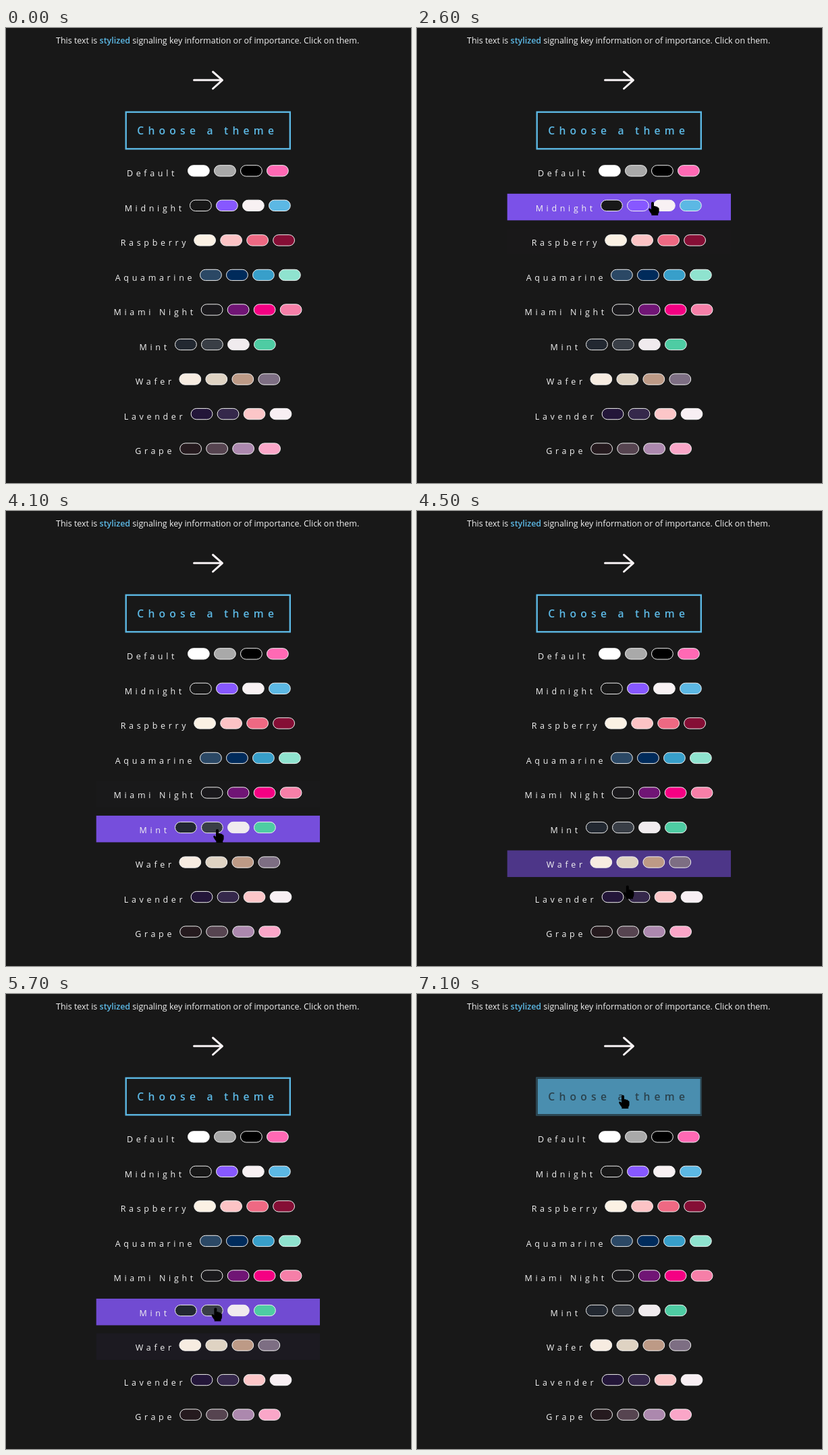
Animation of 600x675 px, one loop 7.2 s. Source, as an HTML page:

```html
<!DOCTYPE html>
<html lang="en">
<head>
<meta charset="utf-8">
<title>Theme picker</title>
<style>
  html, body { margin: 0; width: 100%; height: 100%; overflow: hidden; background: #181818; }
  svg { display: block; width: 600px; height: 675px; }
  text { font-family: "Open Sans", sans-serif; font-size: 12.48px; fill: #f2f2f2; white-space: pre; }
  .label { letter-spacing: 4.68px; }
  .title { font-size: 15.6px; font-weight: 600; letter-spacing: 6.24px; }
  .key { font-weight: 600; fill: #5cb8e4; }
</style>
</head>
<body>
<svg id="stage" viewBox="0 0 600 675">
  <rect width="600" height="675" fill="#181818"/>
  <text x="74" y="22.5">This text is <tspan class="key">stylized</tspan> signaling key information or of importance. Click on them.</text>
  <path d="M278.5 77.3H320M306.5 65L320.5 77.3L306.5 90" fill="none" stroke="#f7f2f4" stroke-width="3" stroke-linecap="round" stroke-linejoin="round"/>
  <rect id="fill" x="176.5" y="123.5" width="245.5" height="57" fill="#5cb8e4"/>
  <rect id="edge" x="177.7" y="124.7" width="243.1" height="54.6" fill="none" stroke-width="2.4"/>
  <text id="title" class="title" x="194.3" y="158">Choose a theme</text>
  <g id="rows"></g>
  <g id="cursor">
    <path id="hand" d="M-2 1.8Q-2 0 0 0Q2 0 2 1.8V6.2Q4 5.4 5 7Q7 6.4 7.6 8.2Q9.6 8 9.6 10.2V14Q9.6 16 8.2 17.6V20H-1.6V18Q-3 16.6 -5.6 12Q-6.4 10 -4.6 9.6Q-3.2 9.6 -2 11.4Z"/>
    <path id="arrow" d="M0 0V15.5L3.6 12.2L6 18L8.4 17L6 11.4H11Z"/>
  </g>
</svg>
<script>
const LOOP = 7200, FRAME = 100, PITCH = 51.53, ROW_H = 39.5;
const ROW_X = 133.7, ROW_W = 331.3, ROW_Y = 194.3;
const ROW_FADE = 200, BUTTON_FADE = 350;

// name, label x, first pill x, pill colours
const themes = [
  ["Default", 178.9, 269, "#fff #a9a9a9 #000 #ff69b4"],
  ["Midnight", 175.7, 272, "#181818 #8758ff #f8f1f3 #5cb8e4"],
  ["Raspberry", 169.7, 278.2, "#fbf1e4 #fcc3c5 #ee6983 #850e35"],
  ["Aquamarine", 161.8, 287, "#2b4865 #002b5b #389fca #8fe3cf"],
  ["Miami Night", 159.6, 288.7, "#1a191c #701575 #f50083 #f67fa8"],
  ["Mint", 197.6, 250, "#222831 #393e46 #f0ebee #4ecca3"],
  ["Wafer", 191.8, 256.4, "#f7ece1 #dfd3c3 #bd9a86 #7d6e83"],
  ["Lavender", 174.8, 273.6, "#231639 #35284b #fcc6c8 #f8eff3"],
  ["Grape", 191.2, 257.2, "#251a1e #564450 #ac88ae #faa6c8"]
];

// pointer tip: time, x, y
const path = [
  [1800, 640, 420], [2200, 440, 341], [2420, 383, 297], [2600, 349, 258],
  [2820, 334, 221], [3050, 328, 243], [3920, 315, 439], [4100, 313, 472],
  [4800, 311, 612], [5000, 310, 617], [5150, 310, 600], [6300, 310, 318],
  [7100, 305, 150], [7200, 305, 148]
];

const $ = id => document.getElementById(id);

function add(parent, tag, attrs) {
  const el = document.createElementNS("http://www.w3.org/2000/svg", tag);
  for (const k in attrs) el.setAttribute(k, attrs[k]);
  return parent.appendChild(el);
}

const bars = themes.map(([name, x, pillX, colours], i) => {
  const dy = i * PITCH, rows = $("rows");
  const bar = add(rows, "rect", { x: ROW_X, y: ROW_Y + dy, width: ROW_W, height: ROW_H, fill: "#8758ff" });
  add(rows, "text", { class: "label", x, y: 220 + dy }).textContent = name;
  colours.split(" ").forEach((fill, j) => add(rows, "rect", {
    x: pillX + 0.5 + j * 39, y: 203.7 + dy, width: 31.8, height: 16.3, rx: 8.15, fill, stroke: "#f2f2f2"
  }));
  return bar;
});

// CSS "ease" curve
function ease(x) {
  if (x <= 0) return 0;
  if (x >= 1) return 1;
  let lo = 0, hi = 1, u = 0.5;
  for (let n = 0; n < 24; n++) {
    u = (lo + hi) / 2;
    const bx = 0.75 * u * (1 - u) * (1 - u) + 0.75 * u * u * (1 - u) + u ** 3;
    if (bx < x) lo = u; else hi = u;
  }
  return 0.3 * u * (1 - u) * (1 - u) + 3 * u * u * (1 - u) + u ** 3;
}

function slope(i, d) {
  const a = path[Math.max(i - 1, 0)], b = path[Math.min(i + 1, path.length - 1)];
  return (b[d] - a[d]) / (b[0] - a[0]);
}

function pointer(t) {
  if (t < path[0][0]) return [700, 420];
  let i = 0;
  while (i < path.length - 2 && t >= path[i + 1][0]) i++;
  const a = path[i], b = path[i + 1], h = b[0] - a[0], u = (t - a[0]) / h, v = 1 - u;
  return [1, 2].map(d =>
    v * v * (1 + 2 * u) * a[d] + u * u * (3 - 2 * u) * b[d] +
    h * u * v * (v * slope(i, d) - u * slope(i + 1, d)));
}

// Row index under the pointer, 9 for the button, -1 for nothing
function hit([x, y]) {
  if (x > 176.5 && x < 422 && y > 123.5 && y < 180.5) return themes.length;
  if (x < ROW_X || x > ROW_X + ROW_W) return -1;
  const i = Math.floor((y - ROW_Y) / PITCH);
  return i >= 0 && i < themes.length && y - ROW_Y - i * PITCH < ROW_H ? i : -1;
}

// Hover levels for every displayed step, from the pointer path
function plan() {
  const fades = Array.from({ length: themes.length + 1 }, () => ({ from: 0, to: 0, start: -1000 }));
  const level = (f, i, t) =>
    f.from + (f.to - f.from) * ease((t - f.start) / (i < themes.length ? ROW_FADE : BUTTON_FADE));
  const steps = [];
  for (let t = 0; t < LOOP; t += 5) {
    const over = hit(pointer(t));
    fades.forEach((f, i) => {
      const to = +(i === over);
      if (to !== f.to) Object.assign(f, { from: level(f, i, t), to, start: t });
    });
    if (t % FRAME === 0) steps.push(fades.map((f, i) => level(f, i, t)));
  }
  return steps;
}

const steps = plan();

function mix(p) {
  const a = [92, 184, 228];
  return `rgb(${a.map(c => Math.round(c + (24 - c) * p))})`;
}

function draw(time) {
  const step = Math.floor((time % LOOP) / FRAME), levels = steps[step];
  const pos = pointer(step * FRAME), over = hit(pos) >= 0;
  bars.forEach((bar, i) => bar.setAttribute("opacity", levels[i]));
  const p = levels[themes.length];
  $("fill").setAttribute("opacity", p);
  $("edge").setAttribute("stroke", mix(p));
  $("title").style.fill = mix(p);
  $("cursor").setAttribute("transform", `translate(${pos})`);
  $("hand").setAttribute("display", over ? "inline" : "none");
  $("arrow").setAttribute("display", over ? "none" : "inline");
}

const begin = performance.now();
function tick() {
  draw(performance.now() - begin);
  requestAnimationFrame(tick);
}
tick();
</script>
</body>
</html>
```
